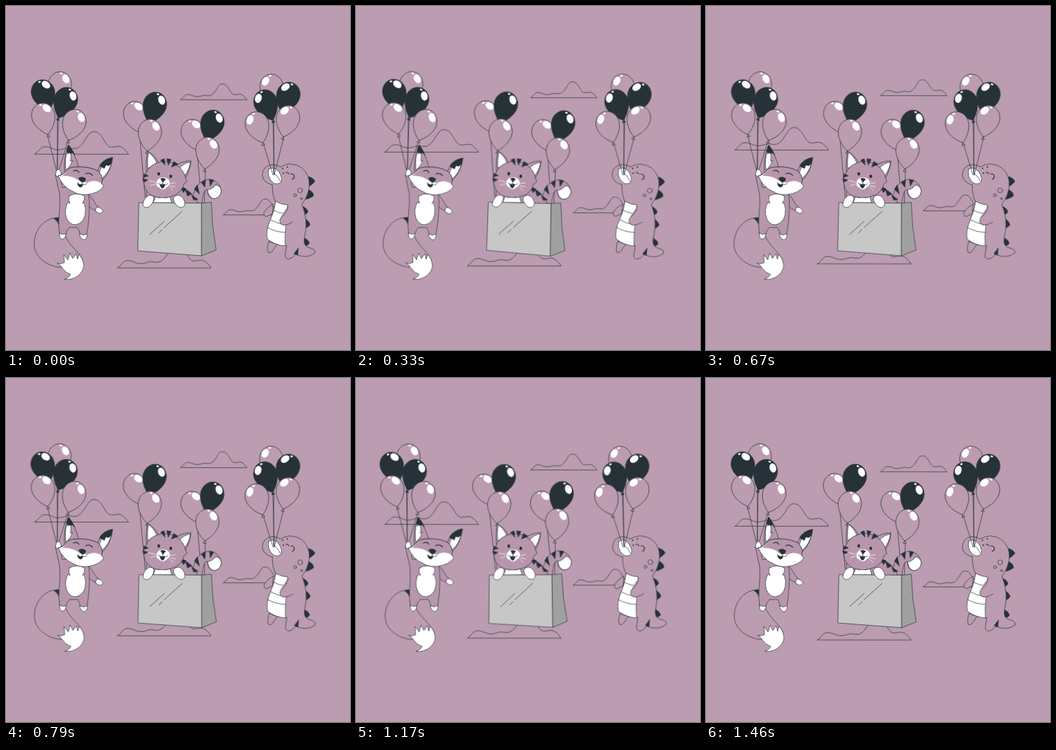
Recreate the animation shown at these times as an HTML page. Size 500 px wide and 500 px high, loop 1.5 s.

```html
<!DOCTYPE html>
<html lang="en">
<head>
<meta charset="utf-8">
<title>Floating animals</title>
<style>
  html, body { margin: 0; width: 100%; height: 100%; overflow: hidden; background: #bb9cb0; }
  svg { display: block; width: 500px; height: 500px; }
  .art { --ink: #263238; --fur: #b796ac; fill: var(--fur); stroke: var(--ink); stroke-width: .7; stroke-linejoin: round; stroke-linecap: round; }
  .pale { fill: #bb9cb0; }
  .line { fill: none; }
  .white { fill: #fff; }
  .dark { fill: var(--ink); }
  .plain { stroke: none; }
  .cloud { animation: float 1.5s -20ms linear infinite; }
  .sway { animation: sway 1.5s -20ms linear infinite; }
  .fox { transform-origin: 96px 247px; }
  .cat { transform-origin: 244px 244px; }
  .dino { transform-origin: 399px 233px; }
  @keyframes float { 50% { transform: translateY(-6.7px); } }
  @keyframes sway {
    0%, 100% { transform: rotate(0deg); }
    25% { transform: rotate(1deg); }
    75% { transform: rotate(-1deg); }
  }
</style>
</head>
<body>
<svg viewBox="0 0 500 500">
  <defs>
    <path id="puff" vector-effect="non-scaling-stroke" d="M0 0C6-3 7-10 14-10.500C22-11 26-6 34-6S45-10 52-8.500S64-8 70-16S78-32.500 86-32.500S98-24 103-16S112-10 119-11S130-8 136 0Z"/>
    <g id="balloon">
      <path d="M0 27l-2 3.600h4z"/>
      <path d="M0 27C-5 24-17 12-17-1C-17-11-9.500-19.500 0-19.500S17-11 17-1C17 12 5 24 0 27Z"/>
      <g class="white plain">
        <ellipse rx="6.800" ry="4.800" transform="translate(7.500-10.300) rotate(53)"/>
        <ellipse rx="1.900" ry="1.300" cx="-.2" cy="-17"/>
      </g>
    </g>
    <g id="bunch" class="pale">
      <path class="line" d="M61 190L74 242M76 165L74 242M74.500 150L75 242M89.500 198L76 242"/>
      <use href="#balloon" transform="translate(78 115) rotate(8)"/>
      <use href="#balloon" class="dark" transform="translate(54 126.500) rotate(-18)"/>
      <use href="#balloon" class="dark" transform="translate(86.500 137.500) rotate(22)"/>
      <use href="#balloon" transform="translate(54.300 160.500) rotate(-14)"/>
      <use href="#balloon" transform="translate(99 169.500) rotate(18)"/>
    </g>
    <g id="trio" class="pale">
      <path class="line" d="M194 186L203 285M206 214L204 285"/>
      <use href="#balloon" transform="translate(188 158) rotate(-15)"/>
      <use href="#balloon" class="dark" transform="translate(216 144.500) rotate(17)"/>
      <use href="#balloon" transform="translate(209 184) rotate(8)"/>
    </g>
  </defs>

  <g class="art">
    <g class="cloud line">
      <use href="#puff" x="42" y="215.300"/>
      <use href="#puff" transform="translate(254 136.200) scale(.706)"/>
      <use href="#puff" transform="translate(316 303.600) scale(.706)"/>
      <use href="#puff" x="162" y="380.700"/>
    </g>

    <g class="sway fox">
      <path class="pale" d="M77 308C58 306 41 324 41 346C41 365 60 378 79 380L112 372C111 361 92 349 86 334Z"/>
      <path class="dark" d="M70 309Q74 307 77 308L77 318Q75 312 70 309Z"/>
      <path class="white" d="M75 374Q80 377 82 381Q87 388 94 390Q91 396 85 397C99 400 114 388 113 376Q112 367 106 361L104 368L102 360L97 367L93 359L90 369L84 361L85 373Q79 376 75 374Z"/>
      <use href="#bunch"/>
      <path d="M119 272Q125 278 131 289L141 297Q137 302 131 298Q123 294 119 290Z"/>
      <path class="white" d="M132 292Q137 292 141 297Q140 302 135 301L130 298Z"/>
      <path d="M72 246Q75 261 78 274Q79 290 77 307Q76 321 78 333L86 334Q88 326 92 322H104Q107 326 108 333L117 334Q121 312 121 297Q122 283 120 272L98 262L82 264Q79 255 80 245Z"/>
      <path class="white" d="M72 246Q72 239 76 237Q81 240 80 246Q76 250 72 246Z"/>
      <path class="white" d="M78 330L82 332L87 331Q87 338 81 339Q77 337 78 330ZM107 331L112 333L118 331Q118 339 113 340Q107 337 107 331Z"/>
      <path class="white" d="M92 276Q90 281 93 287L90 285Q84 297 88 308Q92 318 101 318Q112 316 115 304Q117 294 113 285L111 287Q115 282 114 276Q103 270 92 276Z"/>
      <path d="M85 242Q83 222 91 202Q101 216 106 235ZM133 239Q139 224 155 220Q153 240 141 252Z"/>
      <path class="white" d="M87 238Q85 223 89 210L91 214L94 213Q95 219 94 226L97 224Q94 232 90 236ZM135 245Q137 238 139 233L143 234L145 230L149 232L153 228Q150 242 140 250Z"/>
      <path class="dark" d="M88.500 210Q89 206 91 202Q97 209 100 217L96 213L94 215L91 212L90 215ZM136 232Q142 222 155 220Q154 225 153 229L149 232L145 231L143 236L139 234Z"/>
      <path class="white" d="M76 247Q83 246 90 237Q94 234 104 234Q121 233 134 240Q140 246 140 253L139 258L142 262Q135 272 118 274Q106 275 98 270Q83 264 76 247Z"/>
      <path class="plain" d="M82 247Q88 241 91 237Q94 234 104 234Q121 233 134 240Q140 246 140 253L139 258Q128 251 118 257L106 254Q97 246 82 247Z"/>
      <path class="line" d="M76 247Q83 246 90 237Q94 234 104 234Q121 233 134 240Q140 246 140 253L139 258"/>
      <path class="line" stroke-width="1.200" d="M98 240Q103 237 106 242M116 244Q121 241 126 246"/>
      <path class="dark" d="M106 250Q111 247 116 251Q115 256 111 256Q107 255 106 250Z"/>
      <path class="dark" d="M104 257Q107 261 112 259Q111 264 107 263Q104 261 104 257Z"/>
      <path class="line" d="M111 256Q111 260 108 260M112 259Q115 261 118 258"/>
    </g>

    <g class="sway cat">
      <use href="#trio"/>
      <use href="#trio" x="83.700" y="26"/>
      <path d="M270 286C272 264 283 251 297 252Q311 255 313 269Q311 280 301 280Q292 278 293 267Q287 264 285 286Z"/>
      <path class="white" d="M305 260Q312 261 313 269Q311 280 301 280Q294 277 293 267Q299 267 305 260Z"/>
      <path class="dark" d="M274 266L278 260L281 273ZM284 256L290 253L289 263ZM296 252L302 253L297 261Z"/>
      <path d="M252 262Q270 267 279 287H212V270Z"/>
      <path class="dark" d="M253 262L262 266L258 271ZM261 267L270 273L264 276ZM270 275L279 281L273 282Z"/>
      <path class="white" d="M218 277L222 279L227 277L232 279L238 277L241 286H214Z"/>
      <path d="M204 242Q203 224 206 211Q216 217 222 228ZM248 231Q257 225 269 225Q268 237 261 250Z"/>
      <path class="white" d="M206 236Q205 223 207 213Q215 218 219 228ZM251 237Q258 228 268 227Q266 239 260 246Z"/>
      <path d="M204 242Q208 232 220 228Q234 222 249 232Q259 239 261 250L263 255L259 258Q255 273 240 277Q226 281 213 276Q202 270 201 260L199 253Z"/>
      <path class="dark" d="M225 224L230 222L231 231ZM234 222L240 223L236 231ZM244 226L250 230L241 234ZM201 244L207 247L200 249ZM199 251L206 253L201 256Z"/>
      <path class="white plain" d="M228 249Q235 249 238 255Q239 261 233 264Q228 269 223 264Q217 262 219 255Q222 249 228 249Z"/>
      <g class="dark plain"><ellipse cx="222" cy="244" rx="2" ry="2.600"/><ellipse cx="239.500" cy="247.500" rx="2" ry="2.600"/></g>
      <path class="dark" d="M225 251Q229 249 232 252L228 256Z"/>
      <path class="dark" d="M224 259Q228 261 231 259Q230 265 227 265Q224 263 224 259Z"/>
      <path class="line" d="M228 255V259M228 259Q233 262 235 258M228 259Q223 261 221 257"/>
      <path class="line" stroke="#fff" d="M217 256L208 254M217 259L210 261M239 258L246 257M239 261L246 263M238 263L243 268"/>
      <path fill="#c7c7c7" d="M193.500 285.700L284.500 286.500V363L192 356Z"/>
      <path fill="#a0a0a0" d="M284.500 286.500L298.500 285.300Q299 320 305.500 354.500L284.500 363Z"/>
      <path class="line" d="M209 332L230 313M222 330L227 325M230 322L256 298.500"/>
      <path class="white" d="M199 287Q202 276 210 275Q217 276 214 284Q210 293 204 293Q198 292 199 287ZM243 281Q244 275 251 275Q258 277 260 286Q260 293 254 293Q247 292 243 281Z"/>
    </g>

    <g class="sway dino pale">
      <path class="dark" d="M440 248Q447 250 449 255Q446 259 439 263ZM440 267Q447 270 447 276Q443 279 436 281ZM430 291Q437 293 439 299Q437 303 433 303ZM435 309Q441 313 442 318Q439 322 435 323ZM434 337Q440 340 441 345Q438 349 431 349Z"/>
      <path d="M388 288Q379 293 375 300Q374 306 379 306L387 302Z"/>
      <path d="M382 343Q379 352 381 358Q385 360 388 355L395 345Z"/>
      <path d="M387 260Q374 257 372.500 246Q373 232 387 230.500Q395 231 399 234Q405 230 413 229.500Q433 231 439 248C444 262 438 278 430 288Q440 312 434 336Q431 350 443 352Q451 354 449 359Q438 368 421 361Q416 367 411 368Q405 367 406 361L408 348Q392 348 383 342Q377 329 386 307Q391 296 392 285Q387 276 387 260Z"/>
      <path class="dark" d="M425 352L424 362L419 360Z"/>
      <path class="white" d="M392 284Q401 289 409 289Q411 304 407 318Q405 334 406 349Q390 347 380 339Q377 327 385 309Q390 298 392 284Z"/>
      <path class="line" d="M389 297Q398 302 408 302M385 311Q394 316 402 317M380 322Q393 329 406 329"/>
      <path class="plain" d="M410 291Q399 304 398 313Q400 321 410 318L418 312Z"/>
      <path class="line" d="M410 291Q409 300 400 307Q396 313 400 317Q405 321 417 314"/>
      <path class="white" d="M382 237Q388 233 396 240Q402 249 400 256Q394 261 387 256Q379 247 382 237Z"/>
      <path class="line" d="M389 236Q387 243 394 247L399 255"/>
      <use href="#bunch" transform="matrix(-1 0 0 1 464 3.500)"/>
      <path class="line" stroke-width="1.200" d="M414 244Q419 244 419 248Q419 251 416 252M407 242Q410 241 411 244"/>
      <g class="dark plain"><circle cx="402" cy="236" r="1"/><circle cx="409" cy="234" r="1"/><circle cx="403" cy="243" r="1"/></g>
      <g class="line"><circle cx="427.500" cy="268" r="3.500"/><circle cx="420" cy="275" r="2.100"/><circle cx="429.500" cy="280" r="1.400"/></g>
    </g>
  </g>
</svg>
</body>
</html>
```
